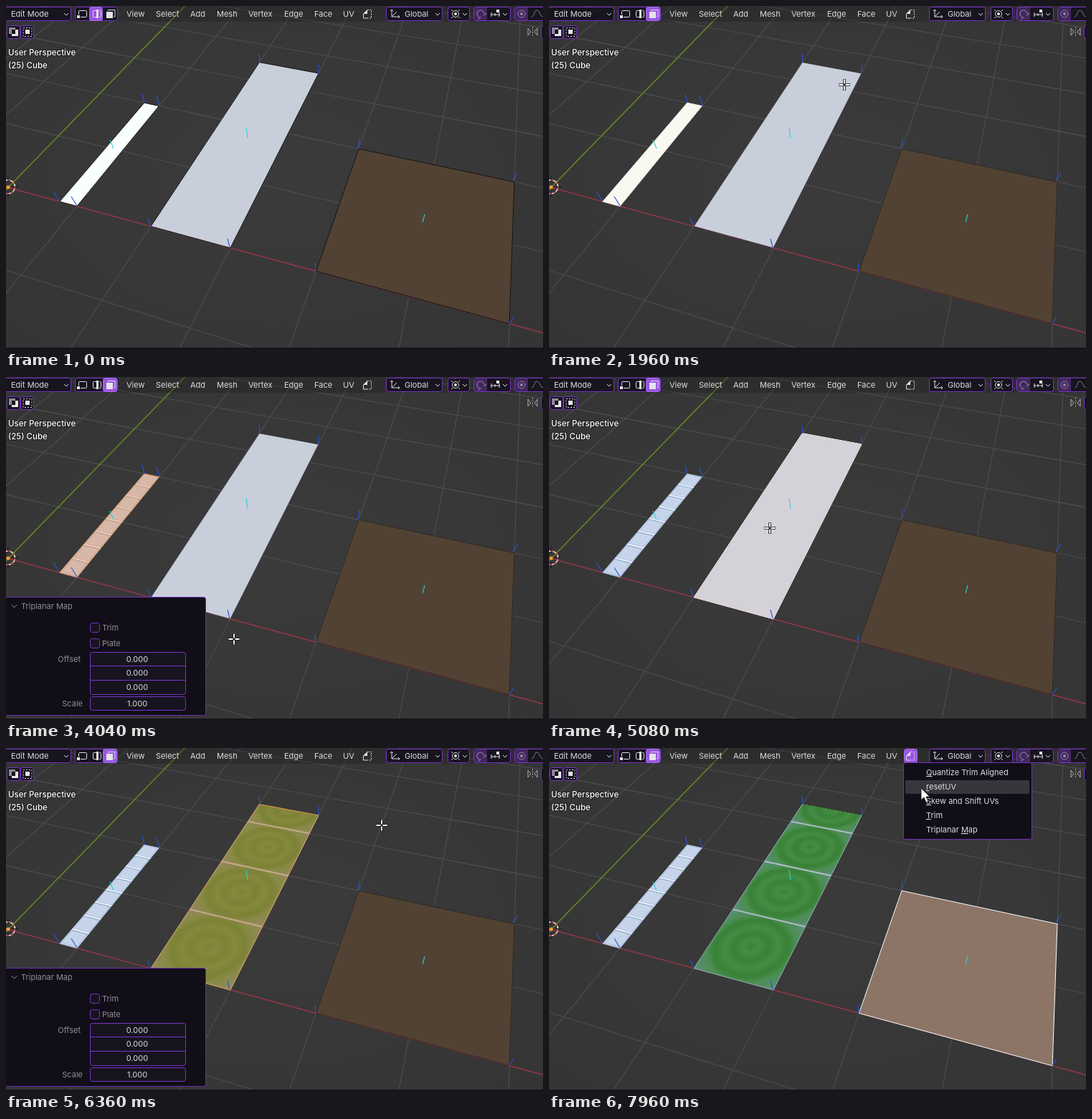
Recreate the animation shown at these times as an HTML page. Size 749 by 479 pixels, loop 8 s.

```html
<!DOCTYPE html>
<html lang="en">
<head>
<meta charset="utf-8">
<title>Triplanar mapping</title>
<style>
html,body{margin:0;width:100%;height:100%;overflow:hidden;background:#393939}
svg{display:block;width:749px;height:479px}
text{font:11px Inter,"Noto Sans",sans-serif;fill:#dcdcde;white-space:pre}
.view{font-size:11.5px;font-weight:500;fill:#fff;paint-order:stroke;stroke:#0006;stroke-width:2px}
.dim{fill:#918e99}
.box{fill:#17141f;stroke:#7a33c8}
.on{fill:#9a55e2;stroke:#a96cf0}
.ic{fill:none;stroke:#dcdce0;stroke-width:1}
.so{fill:#e4e4e8}
tspan{text-decoration:underline}
</style>
</head>
<body>
<svg id="stage" viewBox="0 0 749 479" xmlns="http://www.w3.org/2000/svg"></svg>
<script>
const LOOP = 8000;

// Ground plane to screen, from the origin and two vanishing points.
const project = (x, y) => {
  const a = -0.03397 * x, b = 0.1059 * y, d = 1 + a + b;
  return [(3 - 2728 * a + 735 * b) / d, (253.5 - 490 * a - 499 * b) / d];
};
const points = list => list.map(([x, y]) => project(x, y).map(n => n.toFixed(1)).join()).join(' ');
const quad = (x0, y0, x1, y1) => points([[x0, y0], [x1, y0], [x1, y1], [x0, y1]]);
const line = (x0, y0, x1, y1, attrs) => `<path d="M${x0} ${y0}L${x1} ${y1}" ${attrs}/>`;
const groundLine = (x0, y0, x1, y1, attrs) => line(...project(x0, y0), ...project(x1, y1), attrs);
const text = (x, y, s, attrs = '') => `<text x="${x}" y="${y + 4}" ${attrs}>${s}</text>`;
const rect = (x, y, w, h, attrs) => `<rect x="${x}" y="${y}" width="${w}" height="${h}" ${attrs}/>`;
const box = (x, y, w, h, cls = 'box', id = '') => rect(x + .5, y + .5, w, h, `rx="3" class="${cls}" ${id && `id="${id}"`}`);
const icon = (d, cls = 'ic') => `<path d="${d}" class="${cls}"/>`;
const chevron = x => icon(`M${x - 3} 10l3 3 3-3`);
const mix = (a, b, k) => `rgb(${a.map((v, i) => Math.round(v + (b[i] - v) * k))})`;

function grid() {
  let s = '';
  const style = 'stroke="#4e4e50" stroke-width="1.1"';
  for (let x = -8; x <= 9; x++) if (x) s += groundLine(x, -4, x, 14, style);
  for (let y = -4; y <= 9; y++) if (y) s += groundLine(-20, y, 9, y, style);
  return s + groundLine(0, -.5, 0, 12, 'stroke="#628a24" stroke-width="1.5"')
    + groundLine(-.5, 0, 9, 0, 'stroke="#9c3647" stroke-width="1.4"');
}

function rings() {
  let s = '';
  for (let tile = 0; tile < 4; tile++) {
    s += `<g clip-path="url(#tile${tile})">`;
    for (let r = .72; r > .01; r -= .02) {
      const wave = .5 - .5 * Math.cos(r * 2 * Math.PI / .22);
      const edge = Math.min(1, Math.max(0, (r - .47) / .24));
      const base = [58, 130, 56].map(v => v + wave * 10);
      const loop = Array.from({length: 36}, (_, i) =>
        [2.5 + r * Math.cos(i * Math.PI / 18), tile + .5 + r * Math.sin(i * Math.PI / 18)]);
      s += `<polygon points="${points(loop)}" fill="${mix(base, [96, 146, 124], edge)}"/>`;
    }
    s += '</g>';
  }
  for (let y = 1; y < 4; y++) s += groundLine(2, y, 3, y, 'stroke="#b0bcc6" stroke-width="2"');
  return s + `<polyline points="${points([[2, 3.49], [2, 0], [3, 0], [3, 3.49]])}" fill="none" stroke="#8fa9b0"/>`;
}

function plates() {
  let s = `<polygon points="${quad(.755, 0, 1, 2)}" fill="#bccde5" stroke="#a5bcd9"/>`;
  for (let i = 0; i < 8; i++) {
    const y = i / 4;
    s += `<polygon points="${quad(.79, y + .04, .965, y + .21)}" fill="#c6d4e9" stroke="#d3def0" stroke-width=".8"/>`;
    if (i) s += groundLine(.755, y - .02, 1, y - .02, 'stroke="#93acca"')
      + groundLine(.755, y, 1, y, 'stroke="#f4f8ff" stroke-width="1.300"');
  }
  return s;
}

const FACES = [
  {id: 'strip', pts: quad(.755, 0, 1, 2), fill: '#f8fffd', glow: 'rgba(250,240,225,.4)', art: plates},
  {id: 'plank', pts: quad(2, 0, 3, 3.49), fill: '#c9cedb', glow: 'rgba(255,226,204,.2)', art: rings},
  {id: 'floor', pts: quad(4, 0, 6, 2), fill: '#524233', glow: 'rgba(252,213,201,.34)'}
];
const face = f => `<polygon id="${f.id}" points="${f.pts}" fill="${f.fill}" stroke="#111"/>`
  + (f.art ? `<g id="${f.id}Art">${f.art()}</g>` : '')
  + `<polygon id="${f.id}Sel" points="${f.pts}"/>`;

const NORMALS = [[74, 272, -8, -13], [99, 279, -8, -13], [193, 135, -3, -12], [214, 139, -4, -13],
  [202, 307, -5, -11], [312, 337, -3, -12], [354, 79, -1, -12], [436, 94, 0, -12],
  [432, 371, -1, -12], [491, 199, 2, -13], [707, 244, 7, -11], [702, 444, 6, -10]];
const CENTERS = [[150, 199, -5, -12], [337, 184, -2, -14], [581, 302, 3, -11]];
const ticks = (list, color) => list.map(([x, y, dx, dy]) =>
  line(x, y, x + dx, y + dy, `stroke="${color}" stroke-width="1.1"`)).join('');

const origin = `<g fill="none" stroke-width="1.5"><circle cx="3" cy="252.500" r="9.5" stroke="#f2f2f2"/>
  <circle cx="3" cy="252.500" r="9.5" stroke="#d03a3a" stroke-dasharray="3.7"/>
  <path d="M3 238v8M3 259v8M9 252.500h8" stroke="#16161a" stroke-width="1"/></g>
  <circle cx="3" cy="253" r="2.5" fill="#f7a030"/>`;

const header = rect(0, 0, 749, 22, 'fill="#1a1a1c" opacity=".3"')
  + box(-3, 1, 93, 19) + text(7, 11, 'Edit Mode') + chevron(84)
  + box(96, 1, 59, 19) + box(97, 1, 18, 19, 'on', 'mode0') + box(116, 1, 18, 19, 'on', 'mode1') + box(135, 1, 19, 19, 'on', 'mode2')
  + icon('M103 6.500h8.500q1 0 1 1v7q0 1-1 1h-7.500M101.500 12v-4.500q0-1 1.500-1') + icon('M99 13h4v4h-4z', 'so')
  + icon('M128 6.500h-5.500q-1 0-1 1v7q0 1 1 1h5.500M130 6.500h1.500q1 0 1 1v7q0 1-1 1h-1.500') + icon('M126 5h3v12h-3z', 'so')
  + icon('M142.500 7v-1.500h9.500v9.500h-1.500') + icon('M140 8h9v9h-9z', 'so')
  + [[168, 'View'], [209, 'Select'], [257, 'Add'], [294, 'Mesh'], [338, 'Vertex'], [388, 'Edge'], [430, 'Face'], [470, 'UV']]
    .map(([x, s]) => text(x, 11, s)).join('')
  + box(495, 1, 18, 19, 'on', 'menuBtn')
  + icon('M498 11l6-6v6z', 'so') + icon('M498.500 11v6h5')
  + `<path d="M504 5.500h5.500v11.500h-6" class="ic" stroke-dasharray="2 1.500"/>`
  + box(530, 1, 78, 19) + icon('M538 5v10h11M538 15l7-7M536 7l2-2 2 2M547 13l2 2-2 2') + text(556, 11, 'Global') + chevron(602)
  + box(616, 1, 30, 19) + `<circle cx="627" cy="11" r="4.500" class="ic"/><circle cx="627" cy="11" r="2" class="so"/>`
  + icon('M621 5l2 2M633 5l-2 2M621 17l2-2M633 17l-2-2') + chevron(640)
  + box(652, 1, 51, 19) + rect(653, 2, 18, 18, 'fill="#42275f"')
  + `<path d="M658 15l-1-5a5 5 0 0 1 9-2l1 6M655 15h5M664 15h5" class="ic" opacity=".5" transform="rotate(-35 662 11)"/>`
  + icon('M676 12h13M677 9v6M682 10v4M688 9v6') + icon('M684 5h4v4h-4z', 'so') + chevron(696)
  + box(709, 1, 44, 19) + rect(710, 2, 18, 18, 'fill="#42275f"')
  + `<g opacity=".5"><circle cx="719" cy="11" r="5" class="ic"/><circle cx="719" cy="11" r="2" class="so"/>${icon('M733 15q3 0 4-5t4-4 4 5 4 4')}</g>`
  + box(1, 27, 18, 18) + box(20, 27, 18, 18)
  + rect(4, 30, 9, 9, 'fill="#8d8d93"') + rect(8, 33, 9, 9, 'class="so"') + rect(8, 33, 5, 6, 'fill="#17141f"')
  + `<path d="M24 30.500h12v12h-12z" class="ic" stroke-dasharray="2 2"/>` + icon('M27 33h6v6h-6z', 'so')
  + `<g opacity=".7"><path d="M734.500 29v14" class="ic" stroke-dasharray="2 1.500"/>${icon('M732 36l-4-5v10zM737 36l4-5v10z')}</g>`
  + box(746, 27, 10, 18)
  + text(3, 65, 'User Perspective', 'class="view"') + text(3, 83, '(25) Cube', 'class="view"');

const ITEMS = ['<tspan>Q</tspan>uantize Trim Aligned', '<tspan>r</tspan>esetUV',
  '<tspan>S</tspan>kew and Shift UVs', '<tspan>T</tspan>rim', 'Triplanar <tspan>M</tspan>ap'];
const menu = `<g id="menu">${rect(494.5, 20.5, 179, 107, 'rx="3" fill="#110e18" stroke="#7430bf"')}
  ${rect(497, 25, 173, 19, 'rx="2" fill="#38353d" id="hover"')}
  ${ITEMS.map((s, i) => text(526, 34 + 20 * i, s)).join('')}</g>`;

const field = y => text(183, y, y > 450 ? '1.000' : '0.000', 'text-anchor="middle"');
const panel = `<g id="panel">${rect(-3, 307.5, 281.5, 165, 'rx="3" fill="#110e17" stroke="#6a2bb0"')}
  <path d="M7.500 318l4 4 4-4" fill="none" stroke="#918e99"/>${text(21, 320, 'Triplanar Map', 'class="dim"')}
  ${box(117, 343, 13, 13)}${text(134, 350, 'Trim', 'class="dim"')}
  ${box(117, 365, 13, 13)}${text(134, 372, 'Plate', 'class="dim"')}
  ${text(104, 394, 'Offset', 'class="dim" text-anchor="end"')}${box(117, 384, 133, 59)}
  <path d="M117 403.500h133M117 423.500h133" stroke="#7a33c8"/>${[394, 413, 433].map(field).join('')}
  ${text(107, 456, 'Scale', 'class="dim" text-anchor="end"')}${box(117, 446, 133, 19)}${field(456)}</g>`;

const pointers = `<g id="cross" fill="none"><path d="M-8 0H8M0-8V8" stroke="#16161a" stroke-width="3.600"/>
  <path d="M-7.500 0H-1.500M1.500 0H7.500M0-7.500V-1.500M0 1.500V7.500" stroke="#fff" stroke-width="1.800"/></g>
  <path id="arrow" d="M0 0V16.500L4 13L7 20L10 18.500L7 12H12Z" fill="#fff" stroke="#222" stroke-width=".9"/>`;

const tiles = [0, 1, 2, 3].map(i =>
  `<clipPath id="tile${i}"><polygon points="${quad(2, i, 3, Math.min(i + 1, 3.49))}"/></clipPath>`).join('');

stage.innerHTML = `<defs>${tiles}<radialGradient id="bg" r=".75"><stop stop-color="#3b3b3b"/>
  <stop offset="1" stop-color="#343434"/></radialGradient></defs>`
  + rect(0, 0, 749, 479, 'fill="url(#bg)"') + grid() + FACES.map(face).join('')
  + ticks(NORMALS, '#2b55d8') + ticks(CENTERS, '#22d3d8') + origin
  + rect(0, 477, 749, 2, 'fill="#17131c"') + header + panel + menu + pointers;

// Pointer path: time, x, y.
const PATH = [[40, 737, 189], [480, 173, 65], [600, 173, 65], [840, 146, 11], [920, 146, 11], [1440, 152, 190],
  [1680, 152, 190], [1960, 412, 110], [2200, 566, 48], [2520, 508, 22], [2600, 506, 13], [2680, 506, 13],
  [3200, 543, 114], [3440, 543, 114], [4040, 318, 366], [4240, 318, 366], [4560, 308, 211], [5080, 308, 211],
  [5520, 511, 22], [5560, 508, 14], [5700, 508, 14], [6080, 524, 108], [6360, 524, 108], [6920, 572, 300],
  [7120, 572, 300], [7480, 511, 39], [7640, 505, 12], [7760, 505, 12], [7920, 514, 42], [7960, 519, 56]];

const slope = (i, k) => PATH[i] && PATH[i + 1] ? (PATH[i + 1][k] - PATH[i][k]) / (PATH[i + 1][0] - PATH[i][0]) : 0;
const tangent = (i, k) => {
  const a = slope(i - 1, k), b = slope(i, k);
  return a * b > 0 ? 2 * a * b / (a + b) : 0;
};
function pointerAt(t) {
  const last = PATH.length - 1;
  if (t >= PATH[last][0]) return PATH[last].slice(1);
  const i = Math.max(0, PATH.findIndex(p => p[0] > t) - 1);
  const h = PATH[i + 1][0] - PATH[i][0], u = Math.max(0, (t - PATH[i][0]) / h);
  return [1, 2].map(k => {
    const p = PATH[i][k], q = PATH[i + 1][k], s = u * u * (3 - 2 * u);
    return p + (q - p) * s + h * u * (1 - u) * ((1 - u) * tangent(i, k) - u * tangent(i + 1, k));
  });
}

const $ = id => document.getElementById(id);
const show = (id, on) => $(id).setAttribute('display', on ? 'inline' : 'none');
const within = (t, ...spans) => spans.some(([a, b]) => t >= a && t < b);

function paint(t) {
  const mode = t < 880 ? 1 : 2;
  for (let i = 0; i < 3; i++) show('mode' + i, i === mode);
  const mapped = {strip: t >= 3440, plank: t >= 6360};
  const picked = {strip: within(t, [1480, 4600]), plank: within(t, [4600, 7120]), floor: t >= 7120};
  for (const f of FACES) {
    if (f.art) show(f.id + 'Art', mapped[f.id]);
    const sel = $(f.id + 'Sel');
    show(f.id + 'Sel', picked[f.id]);
    sel.setAttribute('fill', mapped[f.id] ? 'rgba(243,130,51,.36)' : f.glow);
    sel.setAttribute('stroke', mapped[f.id] ? '#dd9450' : '#fff');
    $(f.id).setAttribute('stroke-opacity', mode === 1 ? 1 : .6);
  }
  const open = within(t, [2640, 3440], [5720, 6360], [7720, LOOP]);
  show('menu', open);
  show('menuBtn', open || within(t, [2560, 2640], [5560, 5720], [7640, 7720]));
  show('panel', within(t, [3440, 5080], [6360, 7120]));

  const [x, y] = pointerAt(t), arrowOn = open || y < 22;
  const row = Math.floor((y - 25) / 20);
  show('hover', row >= 0 && row < 5);
  $('hover').setAttribute('y', 25 + 20 * row);
  show('arrow', t >= 40 && arrowOn);
  show('cross', t >= 40 && !arrowOn);
  const at = `translate(${Math.round(x)} ${Math.round(y)})`;
  $('arrow').setAttribute('transform', at);
  $('cross').setAttribute('transform', at);
}

const start = performance.now();
function tick() {
  const t = (performance.now() - start) % LOOP;
  paint(Math.floor(t / 40) * 40);
  requestAnimationFrame(tick);
}
tick();
</script>
</body>
</html>
```
